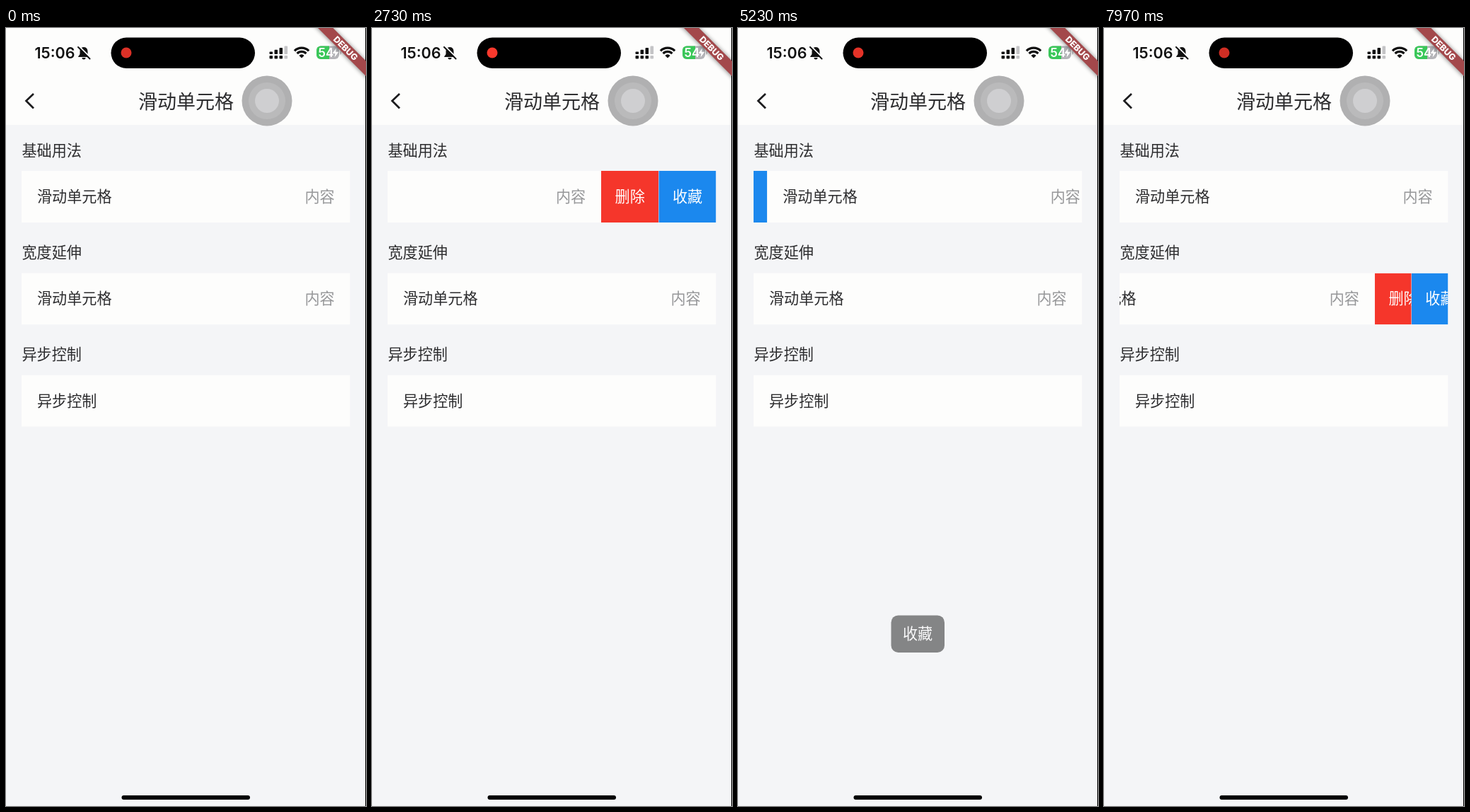
These frames come from a looping animation (509x1100 px, 8 s). An HTML page:

```html
<!DOCTYPE html>
<html lang="zh-CN">
<head>
<meta charset="utf-8">
<style>
  html, body { margin: 0; width: 100%; height: 100%; overflow: hidden; background: #f4f5f7; }
  svg { display: block; }
  text { font-family: "Noto Sans CJK SC", "Noto Sans CJK", sans-serif; font-size: 21.1px; fill: #2c2c2e; white-space: pre; }
  .status text { font-family: Inter, sans-serif; font-weight: 600; }
  .muted { fill: #969799; }
  .light { fill: #fff; }
</style>
</head>
<body>
<svg id="stage" width="509" height="1100" viewBox="0 0 509 1100">
  <defs>
    <filter id="shadow" x="-20%" y="-100%" width="140%" height="300%"><feGaussianBlur stdDeviation="3"/></filter>
  </defs>
  <rect width="509" height="1100" fill="#f4f5f7"/>
  <rect width="509" height="137" fill="#fdfdfc"/>
  <rect x="508" width="1" height="1100"/>

  <g class="status">
    <text x="40.5" y="42.5" style="font-size:21.5px;fill:#111">15:06</text>
    <path d="M110 27c-4 0-5.5 3-5.5 6.5v3c0 1.5-2.5 3-2.5 4.5h16c0-1.5-2.5-3-2.5-4.5v-3c0-3.5-1.5-6.5-5.5-6.5zM107.5 42a2.5 2.5 0 0 0 5 0z" fill="#111"/>
    <path d="M103.5 26l16 16" stroke="#fdfdfc" stroke-width="2"/>
    <path d="M102 27l16.5 16.5" stroke="#111" stroke-width="2" stroke-linecap="round"/>
    <rect x="148.5" y="13.5" width="203.5" height="43.5" rx="21.7"/>
    <circle id="dot" cx="170" cy="35" r="7.5"/>
    <g id="signal"></g>
    <g fill="none" stroke="#111" stroke-width="3.3" transform="translate(0 -.5)">
      <path d="M407.9 32.9a14.3 14.3 0 0 1 20.2 0M411.6 36.6a9 9 0 0 1 12.8 0"/>
      <path d="M418 43l-3.6-3.6a5 5 0 0 1 7.2 0z" fill="#111" stroke="none"/>
    </g>
    <rect x="439" y="25.5" width="32" height="18.5" rx="6" fill="#b4b4b8"/>
    <path d="M445 25.5h12v18.5h-12a6 6 0 0 1-6-6v-6.5a6 6 0 0 1 6-6z" fill="#3ac759"/>
    <path d="M472.5 32a3.5 3.5 0 0 1 0 6z" fill="#b4b4b8"/>
    <text x="441.5" y="41" class="light" style="font-size:17px">54</text>
    <path d="M467 28.5l-5.5 7.5h4l-1 5.5 6-7.8h-4.3z" fill="#fff"/>
  </g>

  <g class="status" transform="translate(480.3 28.6) rotate(45)">
    <rect x="-60" y="-7" width="120" height="15" opacity=".5" filter="url(#shadow)"/>
    <rect x="-60" y="-7.5" width="120" height="15" fill="#a3484b"/>
    <text y="4.5" text-anchor="middle" class="light" style="font-size:12.3px;font-weight:800">DEBUG</text>
  </g>

  <path d="M39 93l-10.5 10 10.5 10.5" fill="none" stroke="#1c1c1e" stroke-width="2.7"/>
  <text x="187" y="113.5" style="font-size:27px">滑动单元格</text>
  <g id="list"></g>

  <g id="toast">
    <rect x="216.5" y="828" width="75.5" height="52.5" rx="10" fill="#000" fill-opacity=".77"/>
    <text x="233" y="862" class="light"></text>
  </g>

  <circle cx="369" cy="103" r="35.5" fill="#b0b0b1"/>
  <circle cx="369" cy="103" r="26" fill="#bababb"/>
  <circle cx="369" cy="103" r="17" fill="#cfcfd1"/>
  <rect x="163.5" y="1085" width="181.5" height="6" rx="3"/>
</svg>
<script>
const LOOP = 8000, WIDTH = 464.6, HEIGHT = 73, BUTTON = 81.3;
const RED = '#f5362b', BLUE = '#1b88ee';
const $ = id => document.getElementById(id);

$('signal').innerHTML = [0, 1, 2, 3].map(i => {
  const x = 372.5 + 7 * i, h = 3.5 + 2.7 * i;
  return `<g fill="${i < 3 ? '#111' : '#c4c4c6'}">
    <rect x="${x}" y="${37 - h}" width="4.6" height="${h}" rx="1"/>
    <rect x="${x}" y="39" width="4.6" height="4.5" rx="1"/></g>`;
}).join('');

// Nested svg elements clip their own overflow.
const button = (label, color, x) =>
  `<svg class="button" x="${x}" width="${BUTTON}" height="${HEIGHT}">
    <rect width="100%" height="100%" fill="${color}"/><text x="19.6" y="44" class="light">${label}</text></svg>`;

const row = (title, label, value, y, buttons) =>
  `<text x="22.5" y="${y - 21.5}">${title}</text>
  <svg x="22" y="${y}" width="${WIDTH}" height="${HEIGHT}">
    <rect width="100%" height="100%" fill="#fdfdfc"/>
    <g class="cell"><text x="22" y="44">${label}</text><text x="400.5" y="44" class="muted">${value}</text>${buttons}</g>
  </svg>`;

const actions = button('删除', RED, WIDTH) + button('收藏', BLUE, WIDTH + BUTTON);
$('list').innerHTML =
  row('基础用法', '滑动单元格', '内容', 202, button('收藏', BLUE, -BUTTON) + actions) +
  row('宽度延伸', '滑动单元格', '内容', 346.4, actions) +
  row('异步控制', '异步控制', '', 490.7, '');

const cells = document.querySelectorAll('.cell');
const stretchy = cells[1].querySelectorAll('.button');
const toast = $('toast'), toastText = toast.querySelector('text');

const ramp = (t, start, span) => Math.min(1, Math.max(0, (t - start) / span));
const smooth = p => p * p * (3 - 2 * p);
const easeOut = p => 1 - (1 - p) ** 2;
const swipe = (t, open, close) => smooth(ramp(t, open, 600)) - easeOut(ramp(t, close, 300));
const fade = (t, start) => ramp(t, start, 200) - ramp(t, start + 1946, 200);
const slide = (cell, x) => cell.setAttribute('transform', `translate(${x} 0)`);

function draw(t) {
  slide(cells[0], BUTTON * (swipe(t, 4050, 5077) - 2 * swipe(t, 1398, 2950)));

  const width = BUTTON * smooth(ramp(t, 7615, 600));
  slide(cells[1], -2 * width);
  stretchy.forEach((b, i) => {
    b.setAttribute('x', WIDTH + i * width);
    b.setAttribute('width', width);
  });

  const second = t >= 5112;
  const alpha = fade(t, second ? 5112 : 2966);
  toastText.textContent = second ? '收藏' : '删除';
  toast.setAttribute('opacity', alpha);
  toast.setAttribute('transform', `translate(0 ${6 * (1 - alpha)})`);

  const glow = 0.5 - 0.5 * Math.cos((t - 1800) / 1542 * 2 * Math.PI);
  $('dot').setAttribute('fill', `rgb(${208 + 47 * glow},${46 + 12 * glow},${36 + 10 * glow})`);
}

function tick(now) {
  draw(now % LOOP);
  requestAnimationFrame(tick);
}
draw(0);
requestAnimationFrame(tick);
</script>
</body>
</html>
```
